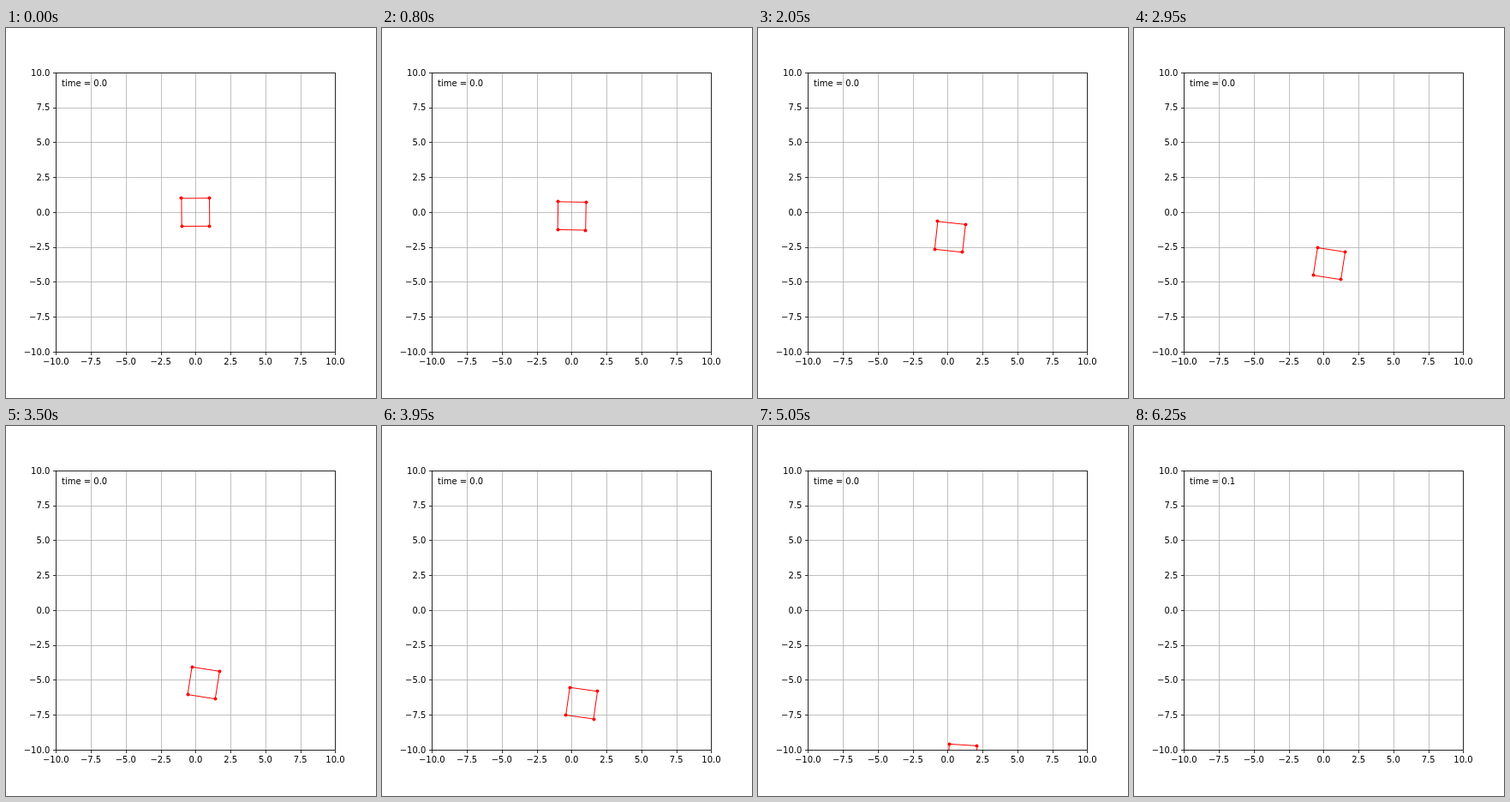
Recreate the animation shown at these times as an HTML page. Size 432 by 432 pixels, loop 7.5 s.

```html
<!DOCTYPE html>
<html lang="en">
<head>
<meta charset="utf-8">
<title>Falling square</title>
<style>
  html, body { margin: 0; width: 100%; height: 100%; overflow: hidden; background: #fff; }
  svg { display: block; width: 432px; height: 432px; }
  text { font: 10px "DejaVu Sans", sans-serif; fill: #000; }
  #grid { stroke: #b0b0b0; stroke-width: 0.8; }
  #axes { stroke: #000; stroke-width: 0.8; fill: none; }
  #body { stroke: #f00; stroke-width: 1; fill: none; }
  #dots { fill: #f00; }
</style>
</head>
<body>
<svg viewBox="0 0 432 432">
  <clipPath id="plot"><rect x="58" y="52" width="327" height="327"/></clipPath>
  <g id="grid"></g>
  <g clip-path="url(#plot)">
    <polygon id="body"/>
    <g id="dots"></g>
  </g>
  <g id="axes"></g>
  <g id="labels"></g>
  <text id="clock" x="65" y="68"></text>
</svg>
<script>
const STEP = 50, LOOP = 7500;
const LEFT = 58.32, BOTTOM = 378, SIZE = 326.16, UNIT = SIZE / 20;
const CORNERS = [[-1, -1], [1, -1], [1, 1], [-1, 1]];

const $ = id => document.getElementById(id);

function add(parent, tag, attrs, text) {
  const el = document.createElementNS("http://www.w3.org/2000/svg", tag);
  for (const key in attrs) el.setAttribute(key, attrs[key]);
  if (text) el.textContent = text;
  return parent.appendChild(el);
}

// Centre a thin line on a whole pixel
const snap = v => Math.floor(v + 0.5) + 0.5;

function buildPlot() {
  const grid = $("grid"), axes = $("axes"), labels = $("labels");
  const x0 = snap(LEFT), x1 = snap(LEFT + SIZE);
  const y0 = snap(BOTTOM), y1 = snap(BOTTOM - SIZE);

  for (let i = 0; i <= 8; i++) {
    const value = -10 + 2.5 * i;
    const label = value.toFixed(1).replace("-", "\u2212");
    const tickX = LEFT + SIZE * i / 8, tickY = BOTTOM - SIZE * i / 8;
    const x = snap(tickX), y = snap(tickY);
    add(grid, "path", { d: `M${x} ${y0}V${y1}M${x0} ${y}H${x1}` });
    add(axes, "path", { d: `M${x} ${y0}v3.5M${x0} ${y}h-3.5` });
    add(labels, "text", { x: tickX, y: 393, "text-anchor": "middle" }, label);
    add(labels, "text", { x: 51.3, y: Math.round(tickY + 3.8), "text-anchor": "end" }, label);
  }
  add(axes, "rect", { x: x0, y: y1, width: x1 - x0, height: y0 - y1 });
}

// Centre and clockwise tilt of the square after n steps
function pose(n) {
  const m = Math.min(n, 88);
  const drift = n * n * (0.00191 - 2e-7 * (n - 68) ** 2);
  const drop = m * m * (0.0168 + 7.5e-6 * m) + 2.95 * (n - m);
  const tilt = 4.3 - 4.7 * Math.cos(2 * Math.PI * n / 130);
  return { x: 221.35 + drift, y: 215.1 + drop, angle: tilt * Math.PI / 180 };
}

buildPlot();
const dots = CORNERS.map(() => add($("dots"), "circle", { r: 2 }));

function draw(time) {
  const n = Math.floor((time % LOOP) / STEP);
  const p = pose(Math.min(n, 110));
  const c = UNIT * Math.cos(p.angle), s = UNIT * Math.sin(p.angle);
  const points = CORNERS.map(([u, v]) => [p.x + u * c - v * s, p.y + u * s + v * c]);

  $("body").setAttribute("points", points.join(" "));
  points.forEach(([x, y], i) => {
    dots[i].setAttribute("cx", Math.floor(x) + 0.5);
    dots[i].setAttribute("cy", Math.floor(y) + 0.5);
  });
  $("clock").textContent = "time = " + (n < 125 ? "0.0" : "0.1");
}

let start = null;
function tick(now) {
  if (start === null) start = now;
  draw(Math.max(0, now - start));
  requestAnimationFrame(tick);
}
draw(0);
requestAnimationFrame(tick);
</script>
</body>
</html>
```
